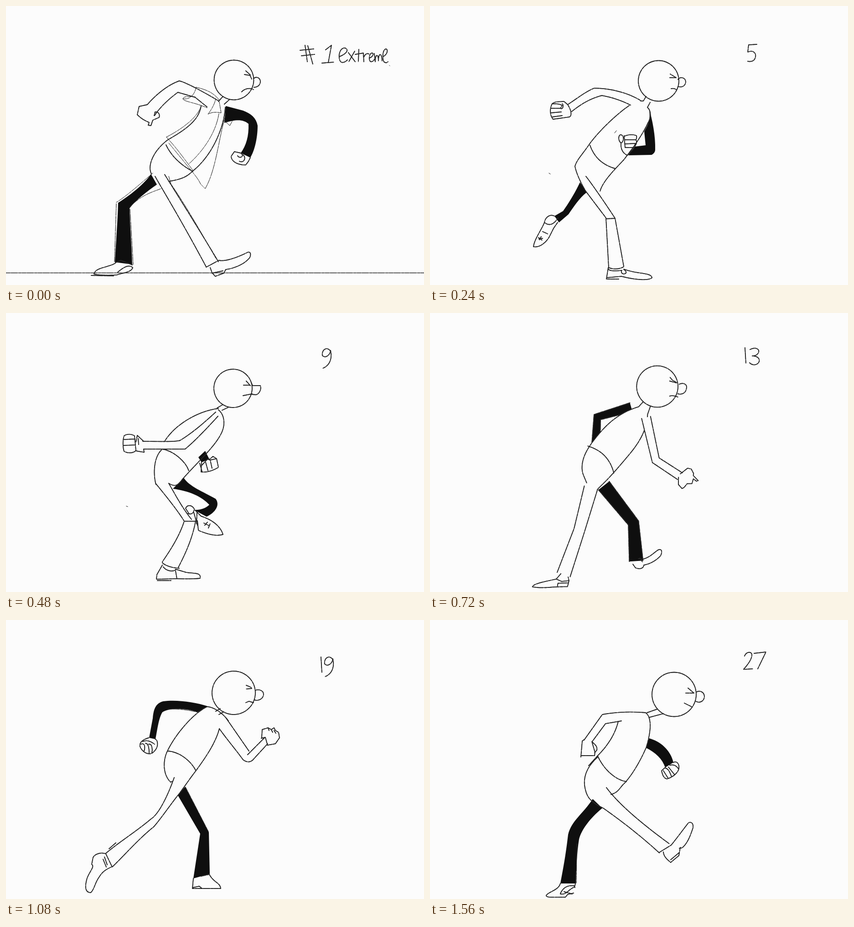
Animation, 917 px wide and 611 px high, one loop 1680 ms. Source, as an HTML page with a canvas:

```html
<!DOCTYPE html>
<html lang="en">
<head>
<meta charset="utf-8">
<title>Walk cycle</title>
<style>
html, body { margin: 0; width: 100%; height: 100%; overflow: hidden; background: #fcfcfc; }
canvas { display: block; }
</style>
</head>
<body>
<canvas id="stage" width="917" height="611"></canvas>
<script>
const ctx = document.getElementById('stage').getContext('2d');
const PAPER = '#fcfcfc', INK = '#262626', BLACK = '#0f0f0f';
const STEP = 120, COUNT = 14, FLOOR = 573;

// Drawn poses: "at" is the step, "rig" holds the joints used for the drawings in between.
const POSES = [
  { at: 0, head: [500, 162, 43.5],
    face: 'M543 160C546 154 557 155 558 165C558 174 551 178 544 178M523 150L535 152M526 142L536 151M534 149L539 160M517 188C524 180 536 179 543 183',
    body: 'M466 209L476 198M479 215L490 205M428 219C424 245 405 265 355 293C322 318 310 350 319 368M351 304C362 328 385 350 410 362M481 222C478 270 450 330 409 362C396 375 383 380 357 384',
    arm: 'M310 216C322 202 349 175 380 164C395 167 440 192 465 207M326 240C335 225 355 205 377 189L415 200L441 221',
    leg: 'M327 373C345 405 385 470 439 571M348 369C380 420 430 500 466 560M439 572L467 557',
    thin: 'M417 178C414 195 402 206 388 203C390 210 415 211 441 223M417 178C440 183 455 190 467 205L472 234C460 232 452 232 443 237C450 228 458 215 460 203M388 203C391 197 400 198 415 199M352 287L359 295C375 312 395 340 410 360M352 287C385 270 420 245 428 219M467 236C460 280 430 320 402 345M480 245C465 300 460 360 437 400L427 390C420 375 410 365 357 300M479 251L491 262L497 251M242 433L238 560M271 440C300 412 320 408 340 400M322 366C300 385 260 420 242 430M272 445L279 566M357 373L362 390C390 430 425 490 460 552',
    hand: 'M310 216L292 220L288 238C300 250 308 252 314 255L312 261L318 262L322 250L336 244C338 238 335 231 327 232L325 240',
    foot: 'M467 557C480 560 505 552 531 539C537 538 538 546 534 552C522 566 500 575 482 577L478 585L459 592L452 584L448 573M452 585L476 580',
    dark: 'M482 219L520 229C538 236 549 245 552 262C552 290 545 318 536 332L515 322C527 305 533 285 532 258C520 248 505 248 479 256ZM318 368C310 382 280 410 246 431C245 470 241 520 239 561L277 566C276 530 272 480 271 443C285 425 308 407 331 391Z',
    farHand: 'M515 322L501 319L494 329C494 341 510 349 526 348L532 340L536 332M508 328C514 336 524 328 515 322M512 340C522 345 528 332 520 326',
    farFoot: 'M240 562L252 557L277 567M240 563C225 573 196 572 193 587C205 590 228 590 243 589C252 585 275 584 278 573C270 565 258 572 245 583M187 590L236 591',
    rig: { arm: [450, 205, 382, 177, 318, 228], farArm: [482, 238, 540, 250, 526, 326], leg: [340, 375, 397, 470, 453, 565], farLeg: [324, 380, 258, 437, 258, 563],
      back: [466, 209, 428, 230, 354, 296, 318, 350, 327, 373], front: [481, 222, 472, 280, 409, 362, 365, 384], belt: [365, 338] } },
  { at: 2, head: [501.5, 164, 44.5],
    face: 'M544 161C547 155 560 155 561 166C560 177 550 179 544 176M526 157L540 157L527 149M529 181C535 180 538 181 541 184',
    body: 'M462 208L468 208L474 198M477 222L483 211M437 218C405 240 365 280 348 305C332 328 322 337 318 351C321 367 332 390 342 406M351 305C359 328 375 347 406 356M477 222C486 230 485 245 478 256C470 275 450 305 425 337C405 358 378 385 373 406',
    arm: 'M302 216C322 203 342 187 360 180C395 180 435 190 462 207M311 231C330 216 350 203 377 196C400 200 420 207 440 217',
    leg: 'M342 406L386 464L392 573M342 373C352 385 390 440 406 465L425 570M386 466L406 465M392 573C402 577 415 577 425 571',
    thin: 'M261 366l3 2M405 278l4 -5',
    hand: 'M302 216L294 209C285 210 275 208 268 214C262 225 263 240 270 248L306 243C312 240 310 228 302 216M268 214C276 214 286 214 290 218L286 224M266 224L286 224M265 234L288 232M268 243L290 240M286 224C292 228 294 216 290 214',
    foot: 'M391 573L387 598L414 598M388 595L420 592C450 600 480 602 487 595C485 583 455 588 425 576M420 580C418 592 440 586 425 577M391 575C392 582 412 580 421 579',
    dark: 'M480 222C488 250 495 285 494 315C494 320 490 324 486 326L435 327L448 308L473 305L470 275C478 260 485 250 480 222ZM329 386C318 410 302 435 292 449L273 460L283 474L304 456C315 440 328 420 344 408Z',
    farHand: 'M419 300C412 295 413 281 419 282C427 284 425 298 419 300M427 285C435 281 447 281 453 284M427 293L452 293M427 302L452 301M428 310L448 310M426 284L428 310M453 284C455 290 450 292 453 296C455 302 448 308 447 312M419 300C418 315 424 323 433 327L447 312',
    farFoot: 'M273 460C264 455 253 462 251 474C262 483 272 478 281 464M251 474C246 488 228 512 227 527C240 530 255 518 262 505L271 487L280 474M247 494L258 499M238 507L246 513M244 505L240 512M239 510L247 509',
    rig: { arm: [450, 212, 368, 188, 306, 224], farArm: [482, 235, 484, 315, 442, 317], leg: [338, 385, 397, 465, 407, 571], farLeg: [335, 396, 298, 452, 278, 467],
      back: [462, 208, 425, 228, 350, 303, 318, 351, 333, 390], front: [480, 226, 475, 265, 408, 355, 376, 398], belt: [362, 345] } },
  { at: 4, head: [498, 165, 42],
    face: 'M538 152L541 159L558 159C561 168 555 178 548 179L538 178M521 158L534 158M527 149L536 159M520 181L540 177',
    body: 'M463 208L475 201M474 213L487 207M466 209C420 215 370 245 348 281M341 298C365 300 395 325 401 346M341 300C325 315 322 350 329 376M466 212C482 225 481 250 470 268C455 295 425 322 387 364C377 379 370 381 357 373',
    arm: 'M460 217C435 240 410 262 382 279C370 283 330 281 300 281M465 226C445 248 415 280 393 298L302 298',
    leg: 'M329 374C350 400 375 430 391 456C380 490 360 520 343 545M357 373C370 395 385 425 407 452M416 455C410 490 395 525 378 557M391 456L416 456M343 547C352 555 365 558 380 559',
    thin: 'M264 423l3 1',
    hand: 'M302 281L288 268L285 283M302 298L303 305L285 302M282 269C274 264 264 265 259 269C255 282 257 297 259 303C268 308 280 307 285 301L282 269M259 277L282 276M258 290L284 289M290 275L291 288',
    foot: 'M343 552L331 573L330 583L372 582C390 582 410 583 426 581C428 568 415 571 395 568L372 561M345 556C352 566 368 567 372 562M332 586L362 586M372 565L375 582',
    dark: 'M437 302L446 320L429 327L422 316ZM390 361C402 380 432 391 460 407C470 420 460 437 440 446L412 431C425 432 438 428 446 420C430 402 400 389 366 385Z',
    farHand: 'M429 327L428 348C440 350 455 345 466 338L462 319L454 314L446 321M430 333L442 320L448 322L452 340M438 327L443 345M425 329L430 347M448 322L462 319',
    farFoot: 'M394 428C397 420 407 419 413 429C412 440 405 442 398 439M394 428L402 440M415 432L428 445C450 452 470 465 476 485C460 490 438 483 422 476L420 455M412 437L420 465M419 436L418 462M434 460L446 466M436 465L442 458M444 471L448 461',
    rig: { arm: [462, 222, 388, 288, 300, 290], farArm: [468, 235, 432, 290, 437, 322], leg: [343, 378, 403, 456, 361, 552], farLeg: [380, 374, 455, 418, 424, 438],
      back: [463, 208, 400, 233, 343, 298, 325, 345, 331, 376], front: [470, 216, 474, 262, 400, 348, 360, 376], belt: [390, 305] } },
  { at: 7, head: [499, 159, 47],
    face: 'M547 154C555 150 565 153 563 163C561 175 552 177 544 175M527 139L532 145L541 150M526 147L541 151M526 180C532 178 540 180 544 182',
    body: 'M459 208L470 197M472 213L482 206M425 187C445 188 460 205 481 221M428 190L416 211C400 240 375 268 346 288M448 222C435 260 410 285 383 306M346 288C330 310 326 345 347 372M335 305C331 330 340 355 352 366M355 346L347 361L354 371M348 288C375 300 400 325 405 352M482 238C480 270 450 320 405 352C395 362 380 372 362 402',
    arm: 'M477 220C500 245 525 275 545 294L580 264M480 244L541 309C560 305 580 285 590 272M538 306L548 297',
    leg: 'M354 370C335 400 305 435 283 458M279 461L249 570M362 402C325 440 290 500 274 577L250 570',
    thin: 'M367 396C400 445 440 510 480 572M455 500L500 545M358 193L420 199M658 186l2 1M597 323l2 1',
    hand: 'M580 266L573 247L577 240L588 238L592 240L606 233L606 237L599 242L608 248L605 258L611 267L612 272L601 277L586 272',
    foot: 'M254 571L244 583C225 588 195 593 192 601C215 605 235 600 247 600L269 599L272 586L270 578M244 583L256 588L271 586M247 598L248 592L270 591',
    dark: 'M425 199L428 185C405 180 380 174 355 177C342 182 334 200 331 225L324 260L341 263C345 240 349 215 357 192C380 190 405 193 425 199ZM366 392L392 366C398 395 412 423 430 450C455 490 480 524 507 549L502 569L484 575C450 527 405 450 366 392Z',
    farHand: 'M341 263C350 266 350 282 349 290C340 298 325 297 311 297C309 285 312 273 322 264M325 265C335 270 345 270 346 278L330 280M311 287C316 280 324 283 323 297M323 285C330 280 334 288 332 298M333 284L345 283M318 283L316 296',
    farFoot: 'M500 562L509 562C525 555 530 545 540 536C547 532 550 538 547 548C538 562 525 570 514 574C515 582 505 585 497 583L490 576M503 560L510 568',
    rig: { arm: [480, 232, 545, 301, 585, 268], farArm: [428, 192, 345, 186, 333, 262], leg: [358, 385, 290, 465, 260, 573], farLeg: [382, 380, 435, 480, 496, 568],
      back: [455, 204, 418, 212, 348, 288, 332, 335, 350, 370], front: [481, 225, 478, 262, 405, 352, 364, 398], belt: [393, 305] } },
  { at: 9, head: [499.5, 159.5, 47.5],
    face: 'M547 154C554 151 565 154 565 163C564 173 554 178 545 175M527 143L537 147L539 150L527 151M526 181L533 178L543 181',
    body: 'M460 200L470 194M467 207L478 201M441 190C455 190 475 203 488 221M441 190C410 205 372 250 354 287C343 310 345 340 361 355L366 353M354 287C380 288 405 308 416 329M468 238C460 270 435 305 416 331C405 345 395 360 381 379',
    arm: 'M483 215L533 287M468 238C485 262 505 285 520 306C528 312 535 312 541 307L574 271M530 295L567 258',
    leg: 'M369 345C355 385 335 425 319 435C290 460 250 485 219 511M381 379C360 405 340 435 324 453C290 480 260 515 233 541L219 512M226 501L241 488',
    thin: 'M355 195C380 194 405 198 420 202M394 366L444 463',
    hand: 'M560 259L569 257L574 275M561 258L562 240L575 236L582 240L588 236L591 242L598 246L600 258L591 271L574 274M575 236L577 242M582 240L585 246M588 242L592 248',
    foot: 'M219 512C210 508 195 512 191 520L188 535C195 540 185 548 178 565C172 585 174 597 186 597C194 590 195 575 205 562C212 550 222 545 231 541M213 524L220 541M216 519L222 536',
    dark: 'M420 202L443 189C415 180 375 174 345 178C330 182 324 192 322 215L314 258L328 261C332 240 335 215 343 202C358 192 395 193 420 202ZM377 384L393 365L445 465L447 556L411 566L426 468Z',
    farHand: 'M313 258C300 262 292 268 294 277C298 288 310 296 320 292C330 285 335 275 331 264L327 260M296 272C304 268 306 278 303 287M306 270C312 270 314 280 314 291M313 272C320 270 322 282 320 291M300 266C310 262 318 266 326 272',
    farFoot: 'M411 566L409 588L471 588C470 575 455 575 446 557L428 561M410 586L424 583L430 588',
    rig: { arm: [476, 228, 528, 300, 570, 264], farArm: [432, 194, 336, 190, 320, 260], leg: [370, 370, 320, 445, 226, 527], farLeg: [386, 376, 435, 466, 429, 562],
      back: [455, 200, 415, 208, 354, 288, 346, 325, 363, 355], front: [486, 222, 466, 250, 416, 331, 384, 376], belt: [400, 292] } },
  { at: 11, head: [517, 164, 48],
    face: 'M565 158C575 155 583 160 583 168C582 178 572 180 563 178M545 150L559 159L544 160M547 183L560 186',
    body: 'M469 202L497 197M478 210L496 204M455 204C425 215 385 260 368 291C355 310 349 330 348 347M440 206C470 201 482 208 490 215M348 346C375 328 415 330 429 354M482 250C465 285 445 320 429 354C418 370 416 385 419 403M348 347C342 375 352 400 375 420C395 436 435 440 463 455M347 350L342 377',
    arm: 'M484 210C500 232 520 262 532 283L551 266M475 240L515 296M515 299C520 305 528 305 533 301L563 273',
    leg: 'M419 403C450 415 475 435 486 450C489 460 480 464 472 464L414 469M440 448L404 456M383 428L465 456',
    thin: 'M469 235l2 1',
    hand: 'M548 266C554 262 560 266 563 273M555 263L555 241L566 240L567 244L580 240L596 260L586 272L568 275',
    foot: 'M404 456L389 463C392 472 400 482 412 484L418 470M404 458L414 471M414 482C422 492 428 502 437 505L449 505L459 498C445 492 432 482 424 470M428 500L446 507',
    dark: 'M456 204C425 209 395 220 376 232C367 245 371 270 368 292C378 268 400 240 425 222ZM346 382L356 398L373 420L372 585L331 574C348 540 352 500 351 455Z',
    farHand: '',
    farFoot: 'M331 576C322 580 312 587 306 598L336 599M329 576L366 580L365 593L360 598L331 597C328 590 330 585 324 590M331 595L360 595M313 591C325 588 326 582 327 578',
    rig: { arm: [482, 228, 524, 292, 557, 269], farArm: [440, 212, 375, 240, 372, 290], leg: [390, 410, 475, 455, 410, 463], farLeg: [360, 395, 361, 470, 351, 578],
      back: [458, 204, 405, 235, 350, 342, 346, 380, 372, 418], front: [488, 215, 482, 250, 429, 354, 419, 400], belt: [395, 315] } },
  { at: 13, head: [535.5, 163, 48.5],
    face: 'M584 158C592 153 602 158 602 168C601 178 592 183 583 178M566 149L579 160L561 160M558 182L574 190',
    body: 'M476 203L499 195M482 213L512 205M413 222C405 255 385 280 368 297L348 319M368 300C340 325 335 350 341 372C345 390 355 400 380 412M368 298C380 325 405 350 431 354M473 203C490 215 482 255 474 280C460 312 440 345 423 361C415 370 412 378 397 382',
    arm: 'M473 203C440 200 405 202 378 207L338 263M420 221L385 227L356 266',
    leg: 'M380 412C420 440 465 475 503 510M387 367C415 405 470 450 525 490M503 509L529 493',
    thin: 'M322 490L321 576',
    hand: 'M338 262L334 265L331 300M332 297L361 297L362 290L355 266C360 272 368 275 366 285L361 291',
    foot: 'M512 508C512 518 522 526 528 531L546 516L549 498M528 525L547 509M529 493C540 480 556 458 567 444C574 441 578 446 577 455C572 470 565 490 553 499L547 500',
    dark: 'M480 259C505 265 528 285 534 312L516 323C510 305 495 290 474 280ZM357 392L378 412C350 435 332 460 327 480C322 510 321 545 320 577L286 577C292 545 297 520 303 470C310 440 335 425 357 392Z',
    farHand: 'M516 323L508 330C510 340 513 347 520 348C530 345 542 338 546 326C548 314 540 308 534 312M512 330L522 346M516 324C524 326 526 334 530 343M523 322L536 338M526 318C534 316 540 318 545 326',
    farFoot: 'M286 577C282 592 260 595 255 603C254 608 265 607 297 607L302 601L315 598M286 600C300 603 305 588 317 585L319 577M286 599C290 590 298 580 316 582L318 586M294 595L312 600',
    rig: { arm: [425, 212, 380, 218, 345, 268], farArm: [478, 268, 515, 290, 525, 318], leg: [385, 392, 450, 445, 516, 500], farLeg: [365, 402, 315, 480, 303, 577],
      back: [476, 203, 412, 228, 364, 302, 340, 355, 360, 400], front: [480, 214, 478, 265, 425, 358, 395, 384], belt: [390, 345] } }
];

const DIGITS = {
  1: 'M3 0L5 34',
  2: 'M2 9C6 -2 20 -2 18 9C16 19 8 29 0 38L20 37',
  3: 'M1 4C14 -3 24 4 19 12C16 17 10 18 6 18C22 18 26 30 16 36C10 39 4 37 0 33',
  5: 'M21 0L3 1L1 17C16 10 23 24 15 34C11 38 5 38 1 37',
  7: 'M0 3L26 0L8 37',
  9: 'M16 6C9 -6 -4 2 -2 15C4 22 15 15 16 4C20 20 15 37 -1 43'
};
const LABEL_Y = [0, 86, 84, 81, 78, 75, 76, 90, 84, 81, 72, 73, 71, 70];
const EXTREME = 'M731 111C745 106 754 96 744 92C732 90 727 112 734 122C739 126 745 122 749 118M751 102L766 122M765 99L752 122M774 95L773 122M766 106L784 103M784 104L785 122M785 112C788 105 792 103 796 105M797 114C805 112 808 103 803 103C796 103 795 122 801 122C805 122 807 119 808 117M808 104L810 122C810 105 817 103 817 120C817 103 824 100 825 120M827 111C836 107 839 96 834 94C826 94 825 115 829 122C833 126 836 124 838 122';

const mix = (a, b, t) => a + (b - a) * t;
const mixAll = (a, b, t) => a.map((v, i) => mix(v, b[i], t));
const pairs = list => list.flatMap((v, i) => i % 2 ? [] : [[v, list[i + 1]]]);

function ink(path, width = 1.9) {
  const p = typeof path === 'string' ? new Path2D(path) : path;
  ctx.strokeStyle = INK;
  ctx.lineWidth = width * 0.7;
  ctx.stroke(p);
  ctx.setLineDash([9, 2, 14, 3, 5, 2]);
  ctx.lineWidth = width;
  ctx.stroke(p);
  ctx.setLineDash([]);
}

function fill(path, color) {
  ctx.fillStyle = color;
  ctx.fill(typeof path === 'string' ? new Path2D(path) : path);
}

function placed(draw, x, y, turn = 0, scale = 1) {
  ctx.save();
  ctx.translate(x, y);
  ctx.rotate(turn);
  ctx.scale(scale, scale);
  draw();
  ctx.restore();
}

function drawHead([x, y, r]) {
  const p = new Path2D();
  p.arc(x, y, r, 0, 2 * Math.PI);
  ink(p);
}

function drawPose(p) {
  fill(p.dark, BLACK);
  drawHead(p.head);
  [p.face, p.body, p.arm, p.leg, p.hand, p.foot, p.farHand, p.farFoot].forEach(s => ink(s));
  ink(p.thin, 0.9);
}

// Angles run from -90 to 270 degrees so limbs always swing through the bottom.
function bone(x0, y0, x1, y1) {
  let angle = Math.atan2(y1 - y0, x1 - x0);
  if (angle < -Math.PI / 2) angle += 2 * Math.PI;
  return [angle, Math.hypot(x1 - x0, y1 - y0)];
}

function swing(a, b, t) {
  const joints = mixAll(a.slice(0, 2), b.slice(0, 2), t);
  for (const i of [0, 2]) {
    const [angle, length] = mixAll(bone(...a.slice(i, i + 4)), bone(...b.slice(i, i + 4)), t);
    joints.push(joints[i] + length * Math.cos(angle), joints[i + 1] + length * Math.sin(angle));
  }
  // Shorten a leg that would reach through the floor.
  const top = joints[1], squash = Math.min(1, (FLOOR - top) / Math.abs(joints[5] - top));
  return joints.map((v, i) => i % 2 ? top + (v - top) * squash : v);
}

function trace(path, points, join) {
  points.forEach(([x, y], i) => i || join ? path.lineTo(x, y) : path.moveTo(x, y));
}

function smooth(path, points, join) {
  const [first, ...rest] = points;
  join ? path.lineTo(...first) : path.moveTo(...first);
  rest.forEach(([x, y], i) => {
    const next = rest[i + 1];
    if (!next) path.lineTo(x, y);
    else path.quadraticCurveTo(x, y, (x + next[0]) / 2, (y + next[1]) / 2);
  });
}

function drawLimb(joints, widths, color) {
  const a = bone(...joints.slice(0, 4))[0], b = bone(...joints.slice(2))[0];
  const turns = [a, (a + b) / 2, b];
  const side = s => pairs(joints).map(([x, y], i) =>
    [x - s * widths[i] * Math.sin(turns[i]), y + s * widths[i] * Math.cos(turns[i])]);
  const shape = new Path2D(), edges = new Path2D();
  trace(shape, side(1));
  trace(shape, side(-1).reverse(), true);
  fill(shape, color);
  trace(edges, side(1));
  trace(edges, side(-1));
  ink(edges);
}

function drawEnd(path, from, to, follow) {
  const turn = (bone(...to.slice(2))[0] - bone(...from.slice(2))[0]) * follow;
  placed(() => placed(() => ink(path), -from[4], -from[5]), to[4], to[5], turn);
}

function drawBetween(a, b, t) {
  const near = t < 0.5 ? a : b, rig = {};
  for (const part of ['arm', 'farArm', 'leg', 'farLeg']) rig[part] = swing(a.rig[part], b.rig[part], t);
  const [back, front, [belt]] = ['back', 'front', 'belt'].map(k => pairs(mixAll(a.rig[k], b.rig[k], t)));
  const head = mixAll(a.head, b.head, t), [hx, hy, r] = head;
  const ARM = [10, 9, 9], LEG = [15, 12, 15];

  drawLimb(rig.farArm, ARM, BLACK);
  drawLimb(rig.farLeg, LEG, BLACK);
  drawEnd(near.farFoot, near.rig.farLeg, rig.farLeg, 0.3);
  drawEnd(a.farHand, a.rig.farArm, rig.farArm, 1);

  const torso = new Path2D(), lines = new Path2D();
  smooth(torso, back);
  smooth(torso, front.slice().reverse(), true);
  fill(torso, PAPER);
  smooth(lines, back);
  smooth(lines, front);
  lines.moveTo(...back[2]);
  lines.quadraticCurveTo(...belt, ...front[2]);
  for (const [x, y] of [back[0], front[0]]) {
    const d = Math.hypot(hx - x, hy - y);
    lines.moveTo(x, y);
    lines.lineTo(mix(hx, x, r / d), mix(hy, y, r / d));
  }
  ink(lines);
  drawHead(head);
  placed(() => ink(near.face), hx - near.head[0], hy - near.head[1]);
  drawLimb(rig.leg, LEG, PAPER);
  drawEnd(near.foot, near.rig.leg, rig.leg, 0.3);
  drawLimb(rig.arm, ARM, PAPER);
  drawEnd(near.hand, near.rig.arm, rig.arm, 1);
}

function drawNumber(n, x, y) {
  for (const digit of String(n)) {
    placed(() => ink(DIGITS[digit]), x, y);
    x += digit === '1' ? 13 : 23;
  }
}

function drawLabel(k) {
  if (k === 0) {
    ink('M645 97L675 94M648 109L677 106M656 86L661 122M662 87L673 127M701 96L714 86L707 124M693 125L719 123');
    ink(EXTREME);
  } else if (k === 7) {
    ink('M650 97L673 94M653 108L680 103M655 88L669 121M664 87L678 124M685 95L691 90');
    drawNumber(15, 687, 89);
    placed(() => placed(() => ink(EXTREME), -731, -110), 733, 111, -0.085, 0.96);
  } else {
    drawNumber(2 * k + 1, k < 5 ? 696 : 688, LABEL_Y[k]);
  }
  if (k % 7 === 0) {
    ink('M841 130l1 1', 1);
    ink('M0 584.5H917', 1.5);
  }
}

function drawStep(k) {
  ctx.fillStyle = PAPER;
  ctx.fillRect(0, 0, 917, 611);
  ctx.lineCap = ctx.lineJoin = 'round';
  const i = POSES.findLastIndex(p => p.at <= k), a = POSES[i], b = POSES[i + 1];
  if (a.at === k) drawPose(a);
  else drawBetween(a, b, (k - a.at) / (b.at - a.at));
  drawLabel(k);
}

const start = performance.now();
let shown = -1;
function tick() {
  const k = Math.floor((performance.now() - start) / STEP) % COUNT;
  if (k !== shown) drawStep(shown = k);
  requestAnimationFrame(tick);
}
tick();
</script>
</body>
</html>
```
